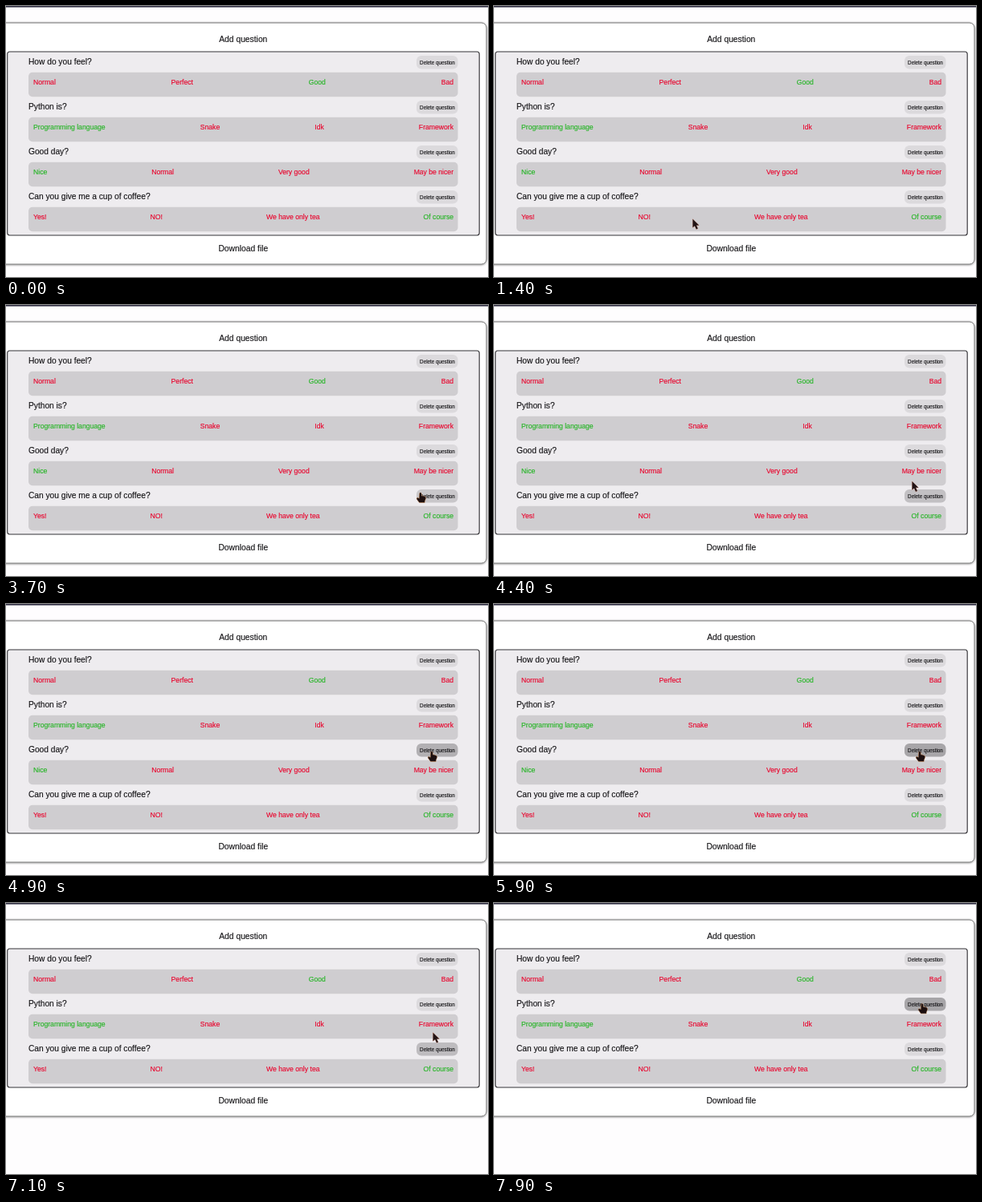
Animation, 600 px wide and 338 px high, one loop 8000 ms. Source, as an HTML page:

```html
<!DOCTYPE html>
<html lang="en">
<head>
<meta charset="utf-8">
<style>
html, body { margin: 0; width: 100%; height: 100%; overflow: hidden; background: #fefdfe; }
svg { display: block; width: 600px; height: 338px; }
text { font-family: "Liberation Sans", Arial, sans-serif; font-size: 10.2px; fill: #161518; stroke: #161518; stroke-width: .15px; }
.right { fill: #26b526; stroke: #26b526; }
.wrong { fill: #e9072f; stroke: #e9072f; }
.answer { font-size: 8.65px; }
.small { font-size: 6.3px; text-anchor: middle; }
.mid { font-size: 10.3px; text-anchor: middle; }
</style>
</head>
<body>
<svg viewBox="0 0 600 338">
  <defs>
    <filter id="shade" x="-5%" y="-5%" width="110%" height="112%">
      <feDropShadow dx="0" dy="0.5" stdDeviation="1.3" flood-color="#000" flood-opacity="0.5"/>
    </filter>
  </defs>
  <rect width="600" height="1.6" fill="#302e42"/>
  <rect id="card" x="-12" y="21" width="610" rx="6" fill="#fff" stroke="#777" filter="url(#shade)"/>
  <text class="mid" x="295.3" y="44.8">Add question</text>
  <rect id="list" x="1.7" y="57" width="587.5" rx="3" fill="#eeecef" stroke="#353438" stroke-width="1.15"/>
  <g id="rows"></g>
  <text class="mid" id="download" x="295.3">Download file</text>
  <g id="cursor" stroke-linejoin="round" paint-order="stroke">
    <path id="arrow" transform="translate(.4 .8) scale(.86)" d="M0 0V12.2L2.9 9.7L5.2 14.7L7.4 13.7L5.2 9H9.1Z" fill="#211314" stroke="#d9a797" stroke-width="1.1"/>
    <path id="hand" transform="scale(.95)" d="M-1.2 .8Q0-.6 1 .8L1.4 4.6L3 4.4L4.6 5L6 5.4Q7.2 6 6.7 8L5.4 11.2V13H-1.6L-4.8 8.4Q-5.3 6.5-3.6 6.8L-1.6 8Z" fill="#1d1010" stroke="#c98a58" stroke-width=".9"/>
  </g>
</svg>
<script>
const NS = "http://www.w3.org/2000/svg";
const LOOP = 8000, ENTER = 700, DELETE_AT = 6100, DELETED = 2;
const PITCH = 56, LEFT = 34, RIGHT = 557, FADE = 280, SAMPLES = 14;
const BUTTON = { x: 511, y: 62, width: 51.5, height: 16.5 };
const $ = id => document.getElementById(id);

// The right answer is marked with a star.
const questions = [
  ["How do you feel?", "Normal", "Perfect", "*Good", "Bad"],
  ["Python is?", "*Programming language", "Snake", "Idk", "Framework"],
  ["Good day?", "*Nice", "Normal", "Very good", "May be nicer"],
  ["Can you give me a cup of coffee?", "Yes!", "NO!", "We have only tea", "*Of course"]
];

const moves = [
  { from: ENTER, to: 1400, x: 247, y: 265 },
  { from: 1450, to: 2000, x: 332, y: 229 },
  { from: 2400, to: 2800, x: 358, y: 232 },
  { from: 2850, to: 3700, x: 516, y: 234 },
  { from: 4150, to: 4850, x: 530, y: 184 },
  { from: 6800, to: 7500, x: 533, y: 125.5 }
];

function add(parent, tag, attrs, content) {
  const el = document.createElementNS(NS, tag);
  for (const key in attrs) el.setAttribute(key, attrs[key]);
  if (content) el.textContent = content;
  parent.appendChild(el);
  return el;
}

function spread(labels) {
  const widths = labels.map(el => el.getComputedTextLength());
  const gap = (RIGHT - LEFT - widths.reduce((a, b) => a + b)) / (labels.length - 1);
  let x = LEFT;
  labels.forEach((el, i) => {
    el.setAttribute("x", x);
    x += widths[i] + gap;
  });
}

const rows = questions.map(([title, ...answers]) => {
  const g = add($("rows"), "g", {});
  add(g, "text", { x: 28, y: 72.7 }, title);
  const button = add(g, "rect", { ...BUTTON, rx: 6 });
  add(g, "text", { class: "small", x: 537, y: 72.7 }, "Delete question");
  add(g, "rect", { x: 28, y: 82.8, width: 534.5, height: 30.4, rx: 5, fill: "#cfcdd0" });
  spread(answers.map(a => add(g, "text", {
    class: "answer " + (a[0] === "*" ? "right" : "wrong"), y: 98.2
  }, a.replace("*", ""))));
  return { g, button };
});

function pointer(t) {
  let x = 236, y = 346;
  for (const m of moves) {
    const k = Math.min(1, Math.max(0, (t - m.from) / (m.to - m.from)));
    const s = k * k * (3 - 2 * k);
    x += (m.x - x) * s;
    y += (m.y - y) * s;
  }
  return { x, y };
}

const rowTop = (i, t) => PITCH * (i - (t >= DELETE_AT && i > DELETED ? 1 : 0));

function isOver(i, t) {
  if (t >= DELETE_AT && i === DELETED) return false;
  const p = pointer(t), dx = p.x - BUTTON.x, dy = p.y - BUTTON.y - rowTop(i, t);
  return dx >= 0 && dx <= BUTTON.width && dy >= 0 && dy <= BUTTON.height;
}

// Share of the last FADE ms that the pointer spent on a button.
function hover(i, t) {
  let hits = 0;
  for (let n = 0; n < SAMPLES; n++) hits += isOver(i, t - FADE * n / SAMPLES);
  return hits / SAMPLES;
}

function draw(t) {
  const gone = t >= DELETE_AT, cut = gone ? PITCH : 0;
  $("card").setAttribute("height", 301 - cut);
  $("list").setAttribute("height", 229 - cut);
  $("download").setAttribute("y", 305.8 - cut);

  rows.forEach(({ g, button }, i) => {
    g.setAttribute("transform", `translate(0 ${rowTop(i, t)})`);
    g.style.display = gone && i === DELETED ? "none" : "";
    const v = Math.round(220 - 53 * hover(i, t));
    button.setAttribute("fill", `rgb(${v},${v - 2},${v + 1})`);
  });

  const { x, y } = pointer(t), over = rows.some((_, i) => isOver(i, t));
  $("cursor").style.display = t < ENTER ? "none" : "";
  $("cursor").setAttribute("transform", `translate(${x} ${y})`);
  $("arrow").style.display = over ? "none" : "";
  $("hand").style.display = over ? "" : "none";
}

const start = performance.now();
function tick(now) {
  draw(Math.max(0, now - start) % LOOP);
  requestAnimationFrame(tick);
}
draw(0);
requestAnimationFrame(tick);
</script>
</body>
</html>
```
